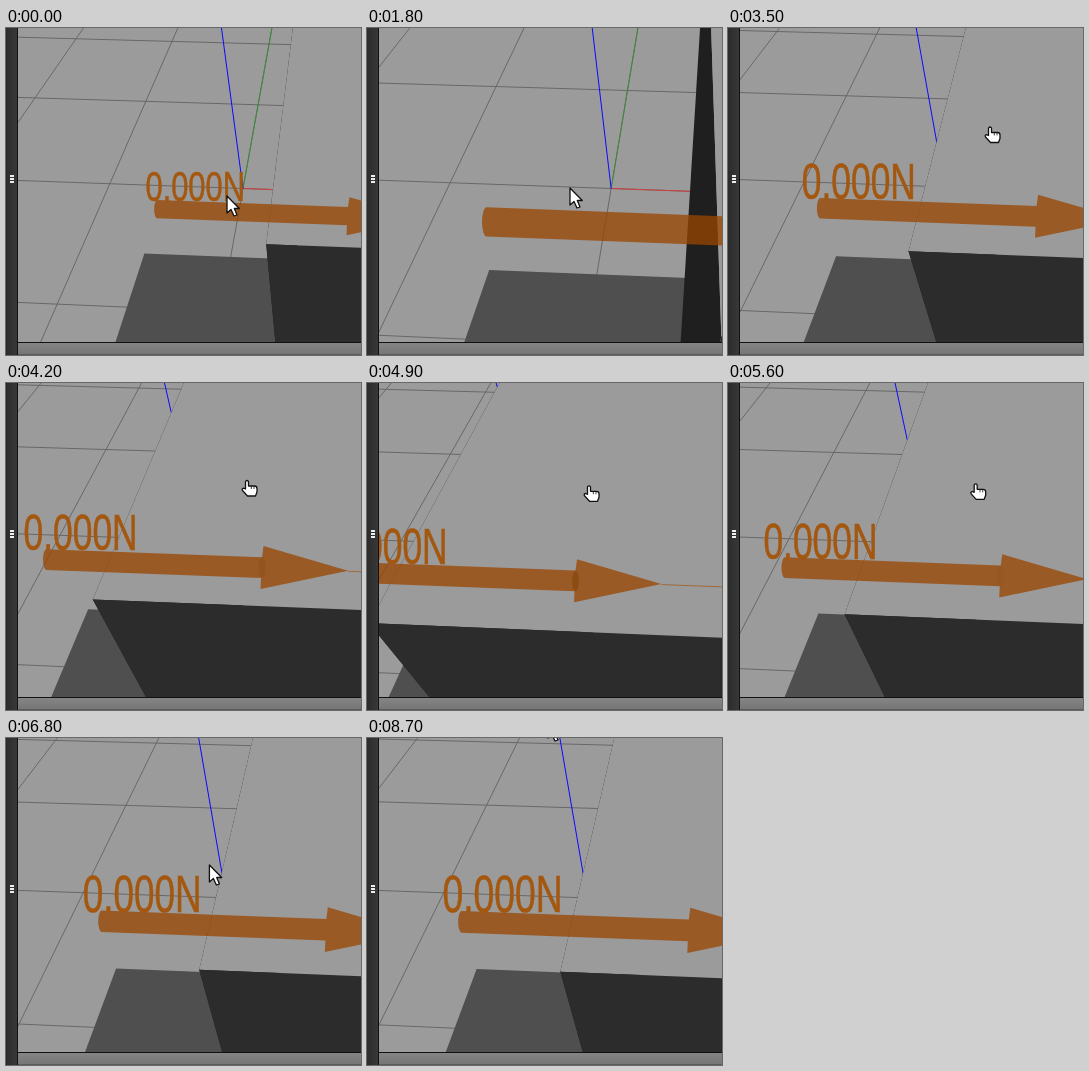
Write an HTML page with a canvas that moves like this. It is 355 px wide and 327 px high and loops after 8800 ms.

```html
<!DOCTYPE html>
<html lang="en">
<head>
<meta charset="utf-8">
<title>Force arrow in a 3D view</title>
<style>
html, body { margin: 0; width: 100%; height: 100%; overflow: hidden; background: #333; }
canvas { display: block; }
</style>
</head>
<body>
<canvas id="stage" width="355" height="327"></canvas>
<script>
const ctx = document.getElementById('stage').getContext('2d');
const LOOP = 8800, LEFT = 12, RIGHT = 355, FLOOR = 314;

// Perspective: homogeneous image steps for one unit along each world axis.
const AXIS_X = [132.4, 3.55, -.0078];
const AXIS_Y = [332, -367, 1].map(v => v * .1888);
const AXIS_Z = [-296, -600, -1];
const START = [237, 160, 1];

// Scene anchors, relative to the world origin in the same space.
const SLAB = [-117.3, 35.1, -.135];
const BOX = [-164.4, -99.7, -.721];
const ARROW = [-167.5, -76.7, -.54];
const LABEL = [-176.9, -85.9, -.572];

const run = (a, b) => Array.from({ length: (b - a) / 100 + 1 }, (_, i) => a + i * 100);

// Each move advances evenly at its redraw times; the pointer ends at "to".
// Zooming dollies along the ray through "spot", panning follows the pointer.
const moves = [
  { times: run(100, 300), to: [203, 160] },
  { times: [800, 1400, 1500, 1800], to: [203, 160], zoom: -.1735, spot: [203, 160] },
  { times: [2400, ...run(2700, 3100)], to: [279, 100], zoom: .1185, spot: [203, 160] },
  { times: [...run(3200, 3500), ...run(3900, 4200)], to: [237, 97], pan: true },
  { times: [...run(4300, 4900)], to: [218, 102.3], pan: true },
  { times: [...run(5000, 5200), ...run(5400, 6000)], to: [260.8, 99], pan: true },
  { times: [...run(6200, 6800), 7400, 7500], to: [187, 135], zoom: -.019, spot: [190, 135] },
  { times: [8000], to: [86, 276] },
  { times: run(8100, 8200), to: [187, 3] },
  { times: [8300], to: [181, -40] },
  { times: [8700], to: [181, -17] }];

const hand = new Path2D('M2.500 9V2a1.500 1.500 0 0 1 3 0V6H11.500q2.500 0 2.500 2.500V12' +
  'L12.500 16H4.500L-.5 10.500q-1-1.800 1-2.300z');
const knuckles = new Path2D('M8.300 6v3M11 6.500v2.500');
const tip = new Path2D('M0 0V17L4 13.500L7 20L10 19L7.300 12.500H12.300Z');

let origin;

function viewAt(t) {
  const eye = [...START];
  let mouse = [221, 168], dragging = false;
  for (const { times, to, zoom, spot, pan } of moves) {
    const k = times.filter(x => x <= t).length / times.length;
    if (!k) break;
    const next = mouse.map((v, i) => v + (to[i] - v) * k);
    if (zoom) [...spot, 1].forEach((v, i) => eye[i] += v * zoom * k);
    if (pan) next.forEach((v, i) => eye[i] += v - mouse[i]);
    mouse = next;
    dragging = !!pan;
  }
  return { eye, mouse, dragging };
}

// Screen x, y and depth of a point given by anchor and world offsets.
function project(anchor, x = 0, y = 0, z = 0) {
  const [px, py, depth] = origin.map((v, i) =>
    v + anchor[i] + x * AXIS_X[i] + y * AXIS_Y[i] + z * AXIS_Z[i]);
  return [px / depth, py / depth, depth];
}

const ground = (x, y, z) => project([0, 0, 0], x, y, z);

function line(color, [x1, y1], [x2, y2]) {
  ctx.strokeStyle = color;
  ctx.lineWidth = 1;
  ctx.beginPath();
  ctx.moveTo(x1, y1 + .5);
  ctx.lineTo(x2, y2 + .5);
  ctx.stroke();
}

function face(color, ...pts) {
  ctx.fillStyle = color;
  ctx.beginPath();
  pts.forEach(([x, y]) => ctx.lineTo(x, y));
  ctx.fill();
}

function drawGround() {
  const gray = '#686868';
  for (let y = -1; y <= 3; y++) line(gray, ground(-5, y), ground(3, y));
  for (let x = -5; x <= 0; x++) line(gray, ground(x, -2), ground(x, 4));
  const zero = ground();
  line('#3c8c3c', zero, ground(0, 4));
  line('#d23c3c', zero, ground(3, 0));
  line('#0a0aff', zero, ground(0, 0, .5));
}

function drawBlocks() {
  const slab = (x, y) => project(SLAB, x, y);
  face('#4f4f4f', slab(0, 0), slab(1.02, 0), slab(1.02, -2), slab(0, -2));

  const wide = 2, deep = .95, low = -.5;
  const box = (x, y, z) => project(BOX, x, y, z);
  face('#1f1f1f', box(0, 0, 0), box(0, deep, 0), box(0, deep, low), box(0, 0, low));
  face('#9b9b9b', box(0, 0, 0), box(0, deep, 0), box(wide, deep, 0), box(wide, 0, 0));
  face('#2c2c2c', box(0, 0, 0), box(wide, 0, 0), box(wide, 0, low), box(0, 0, low));
}

function drawArrow() {
  const [tx, ty, depth] = project(ARROW);
  const [hx, hy] = project(ARROW, .65);
  const point = project(ARROW, .905);
  const r = 4.2 / depth, half = r * 2.08;
  ctx.fillStyle = 'rgba(154,70,0,.76)';
  ctx.beginPath();
  ctx.ellipse(tx, ty, r * .32, r, 0, Math.PI / 2, Math.PI * 1.5);
  ctx.lineTo(hx, hy - r);
  ctx.lineTo(hx + 1.5, hy - half);
  ctx.lineTo(point[0], point[1]);
  ctx.lineTo(hx - 1.5, hy + half);
  ctx.lineTo(hx - 1, hy + r);
  ctx.closePath();
  ctx.fill();

  // The shaft's end shows through the cone when seen from the right.
  const inner = Math.max(0, Math.min(1, (290 - hx) / 80));
  ctx.fillStyle = `rgba(130,60,0,${inner * .5})`;
  ctx.beginPath();
  ctx.ellipse(hx, hy, r * .32, r, 0, 0, 7);
  ctx.fill();
  line('#a0683a', point, project(ARROW, 3));
}

function drawLabel() {
  const [x, y, depth] = project(LABEL);
  if (depth < .26) return;      // too close to the camera
  const size = 13.2 / depth / .71;
  ctx.save();
  ctx.translate(x, y);
  ctx.scale(.71, 1);
  ctx.font = `${size}px "Liberation Sans", Arial, sans-serif`;
  ctx.fillStyle = ctx.strokeStyle = '#a4570f';
  ctx.lineWidth = .6;
  ctx.fillText('0.000N', -size * .03, 0);
  ctx.strokeText('0.000N', -size * .03, 0);
  ctx.restore();
}

function drawFrame() {
  const side = ctx.createLinearGradient(0, 0, 11, 0);
  side.addColorStop(0, '#2c2c2c');
  side.addColorStop(1, '#383838');
  ctx.fillStyle = side;
  ctx.fillRect(0, 0, 11, 327);
  ctx.fillStyle = '#111';
  ctx.fillRect(11, 0, 1, 327);
  ctx.fillRect(LEFT, FLOOR, 343, 1);
  const bar = ctx.createLinearGradient(0, 315, 0, 326);
  bar.addColorStop(0, '#858585');
  bar.addColorStop(1, '#767676');
  ctx.fillStyle = bar;
  ctx.fillRect(LEFT, 315, 343, 11);
  ctx.fillStyle = '#5c5c5c';
  ctx.fillRect(LEFT, 326, 343, 1);
  ctx.fillStyle = '#eee';
  for (let i = 0; i < 3; i++) ctx.fillRect(4, 147 + i * 3, 4, 2);
}

function drawPointer([x, y], dragging) {
  const shape = dragging ? hand : tip;
  ctx.save();
  ctx.translate(x, y);
  ctx.lineJoin = 'round';
  ctx.lineWidth = 1.3;
  ctx.strokeStyle = '#111';
  ctx.fillStyle = '#fff';
  ctx.fill(shape);
  ctx.stroke(shape);
  if (dragging) {
    ctx.lineWidth = .8;
    ctx.stroke(knuckles);
  }
  ctx.restore();
}

function draw() {
  const { eye, mouse, dragging } = viewAt(performance.now() % LOOP);
  origin = eye;
  ctx.save();
  ctx.beginPath();
  ctx.rect(LEFT, 0, RIGHT - LEFT, FLOOR);
  ctx.clip();
  ctx.fillStyle = '#9b9b9b';
  ctx.fillRect(0, 0, RIGHT, FLOOR);
  drawGround();
  drawBlocks();
  drawArrow();
  drawLabel();
  ctx.restore();
  drawFrame();
  drawPointer(mouse, dragging);
  requestAnimationFrame(draw);
}
draw();
</script>
</body>
</html>
```
